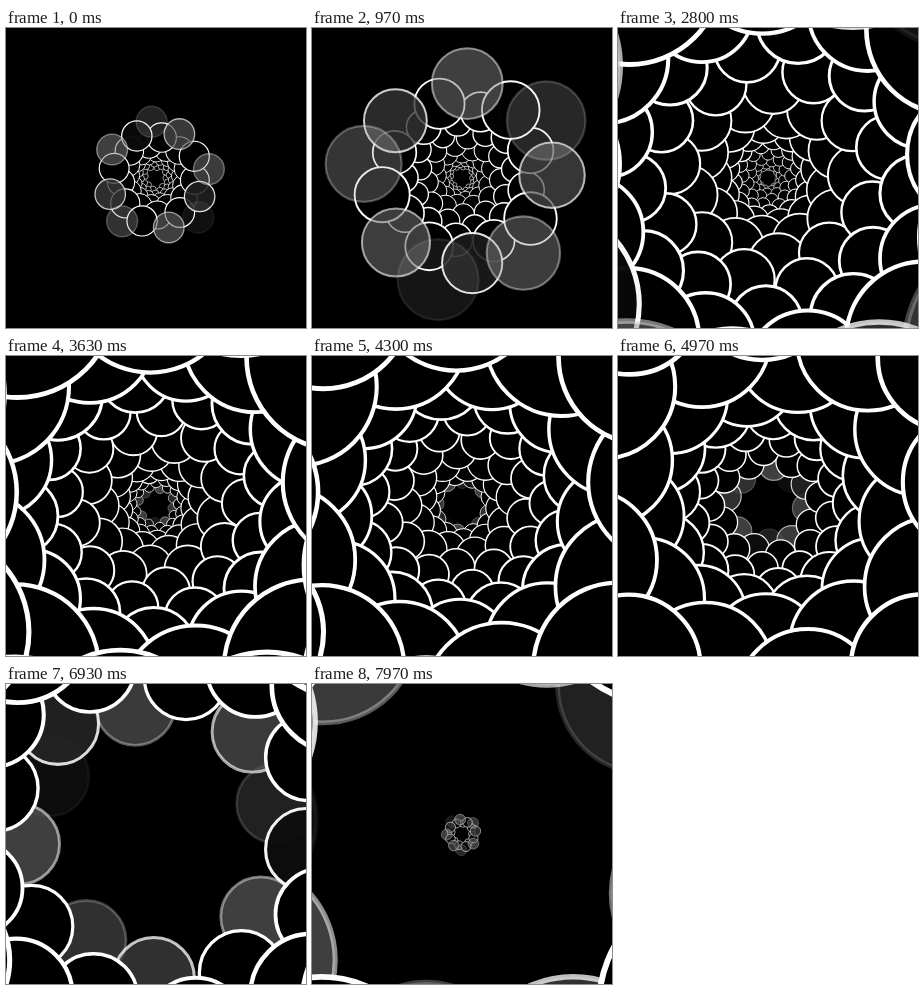
Animation of 300 by 300 pixels, one loop 8000 ms. Source, as an HTML page with a canvas:

```html
<!DOCTYPE html>
<html lang="en">
<head>
<meta charset="utf-8">
<title>Golden spiral of discs</title>
<style>
html, body { margin: 0; width: 100%; height: 100%; overflow: hidden; background: #000; }
canvas { display: block; width: 300px; height: 300px; }
</style>
</head>
<body>
<canvas id="stage"></canvas>
<script>
const SIZE = 300;
const LOOP = 8;               // seconds
const COUNT = 156;
const GOLDEN = Math.PI * (3 - Math.sqrt(5));
const FIRST = 10;             // distance of the innermost disc
const GROWTH = 1.025;         // ratio of neighbouring distances
const SPEED = 25;             // discs passed per second by the fading edges
const CYCLE = 250;            // discs between two leading edges
const BAND = 144.4;           // discs visible at once
const LEAD = 71.65;           // leading edge at the start
const FADE = 10;

const canvas = document.getElementById('stage');
const ctx = canvas.getContext('2d');
const ratio = window.devicePixelRatio || 1;
canvas.width = canvas.height = SIZE * ratio;

const mod = (a, b) => ((a % b) + b) % b;

// Opacity: a band of discs sweeps outward with soft edges.
function opacity(n, t) {
  const u = mod(SPEED * t + LEAD - n, CYCLE);
  return Math.max(0, Math.min(1, Math.min(u, BAND - u) / FADE));
}

// Outer radius relative to distance: a wave travelling inward.
function swell(n, t) {
  return 0.332 - 0.071 * Math.sin(0.1 * n + 0.4 * Math.PI * t - 0.05);
}

function drawDisc(n, t) {
  const a = opacity(n, t);
  if (a <= 0) return;
  const dist = FIRST * GROWTH ** n;
  const angle = n * GOLDEN;
  const line = 0.4 + 0.018 * dist;
  const radius = dist * swell(n, t) - line / 2;
  const shade = Math.round(255 * (1 - a));
  ctx.globalAlpha = a;
  ctx.beginPath();
  ctx.arc(dist * Math.cos(angle), dist * Math.sin(angle), radius, 0, 2 * Math.PI);
  ctx.fillStyle = `rgb(${shade},${shade},${shade})`;
  ctx.fill();
  ctx.lineWidth = line;
  ctx.strokeStyle = '#fff';
  ctx.stroke();
}

function draw(t) {
  ctx.setTransform(ratio, 0, 0, ratio, 0, 0);
  ctx.globalAlpha = 1;
  ctx.fillStyle = '#000';
  ctx.fillRect(0, 0, SIZE, SIZE);
  ctx.translate(SIZE / 2, SIZE / 2);
  for (let n = 0; n < COUNT; n++) drawDisc(n, t);
}

let start;
function tick(now) {
  if (start === undefined) start = now;
  draw(Math.max(0, now - start) / 1000 % LOOP);
  requestAnimationFrame(tick);
}
draw(0);
requestAnimationFrame(tick);
</script>
</body>
</html>
```
